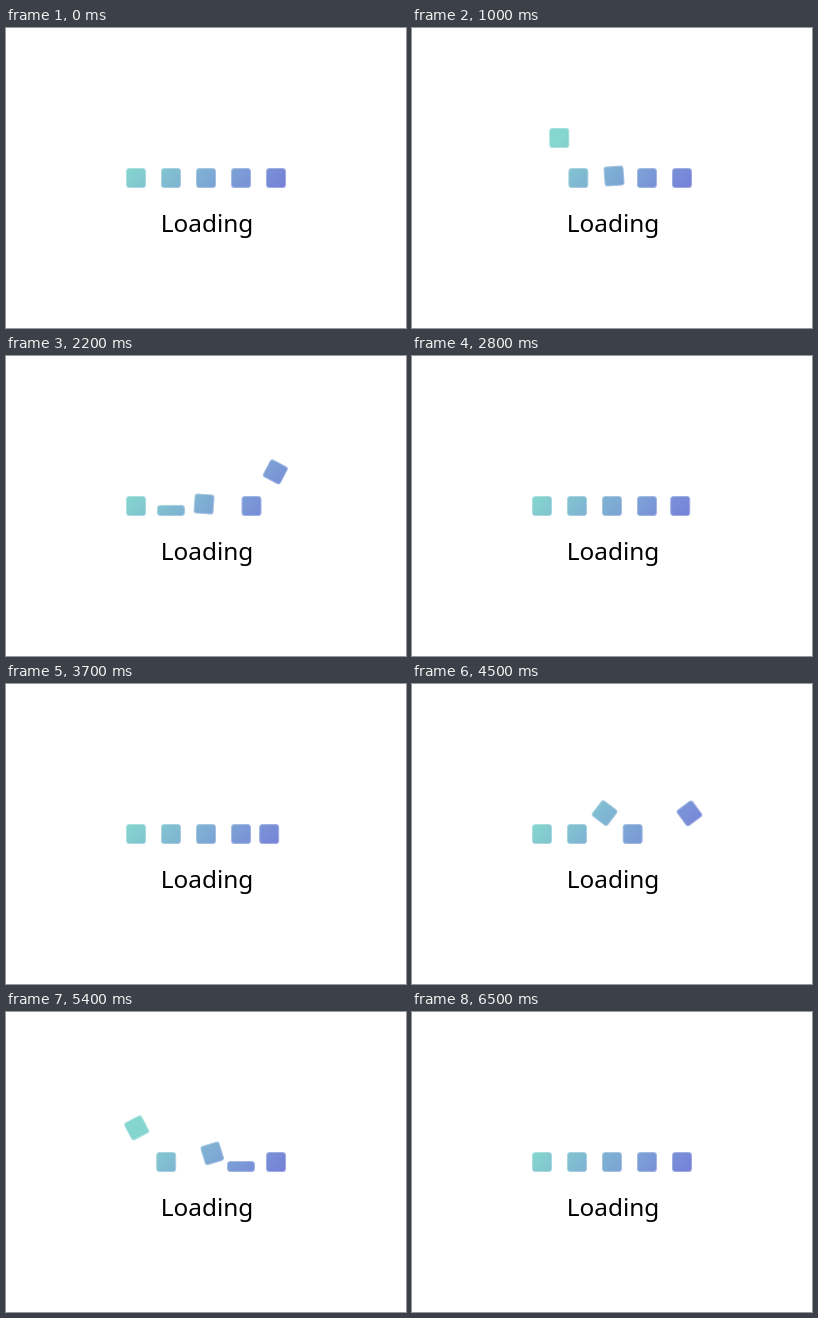
Animation of 400 by 300 pixels, one loop 6.7 s. Source, as an HTML page:

```html
<!DOCTYPE html>
<html lang="en">
<head>
<meta charset="utf-8">
<title>Loading</title>
<style>
  html, body { margin: 0; width: 100%; height: 100%; overflow: hidden; background: #fff; }
  svg { display: block; width: 100vw; height: 100vh; }
  text { font: 24.4px "Noto Sans", "Open Sans", sans-serif; text-anchor: middle; }
</style>
</head>
<body>
<svg viewBox="0 0 400 300">
  <defs>
    <linearGradient id="tint" gradientUnits="userSpaceOnUse" x1="125" y1="135" x2="215" y2="225">
      <stop offset="0" stop-color="#85d6ce"/>
      <stop offset="1" stop-color="#767fd9"/>
    </linearGradient>
    <mask id="squares" maskUnits="userSpaceOnUse" x="0" y="0" width="400" height="300"></mask>
  </defs>
  <rect width="400" height="300" fill="url(#tint)" mask="url(#squares)"/>
  <text x="201" y="204">Loading</text>
</svg>
<script>
const LOOP = 6700, SLIDE = 3000, JUMP = 1000, SQUASH = 500, BACK = 3300;
const GAP = 35, FIRST = 130, REST_Y = 150, SIZE = 20, RIM = 1;
const JUMP_OUT = [500, 900, 1300, 1800];
const JUMP_BACK = [5000, 4600, 4200, 3800];

// Hop path: an ellipse entered and left below its centre.
const RX = 25.3, HEIGHT = 40;
const DIP = Math.acos(GAP / 2 / RX);
const RY = HEIGHT / (1 + Math.sin(DIP));

const clamp = v => Math.min(1, Math.max(0, v));
const smooth = u => { u = clamp(u); return u * u * (3 - 2 * u); };
const sine = u => (1 - Math.cos(Math.PI * clamp(u))) / 2;
const bump = u => smooth(2 * u) - smooth(2 * u - 1);

const mask = document.getElementById("squares");

function setAttrs(el, attrs) {
  for (const name in attrs) el.setAttribute(name, attrs[name]);
}

const squares = Array.from({ length: 5 }, () => {
  const rect = document.createElementNS("http://www.w3.org/2000/svg", "rect");
  setAttrs(rect, { rx: 2.6, fill: "#fff", stroke: "#b4b4b4", "stroke-width": RIM });
  return mask.appendChild(rect);
});

// Squashing keeps the bottom edge in place and the corners round.
function place(rect, x, y, turn = 0, squash = 0) {
  const w = SIZE * (1 + 0.44 * squash), h = SIZE * (1 - 0.5 * squash);
  setAttrs(rect, {
    x: (RIM - w) / 2, y: SIZE / 2 - h + RIM / 2, width: w - RIM, height: h - RIM,
    transform: `translate(${x} ${y}) rotate(${turn})`
  });
}

function placeJumper(i, t) {
  const out = JUMP_OUT[i], back = JUMP_BACK[i];
  // 0 = right-hand slot, 1 = left-hand slot
  const p = sine((t - out) / JUMP) - sine((t - back) / JUMP);
  const angle = -DIP + p * (Math.PI + 2 * DIP);
  const x = FIRST + GAP * (i + 0.5) + RX * Math.cos(angle);
  const y = REST_Y - RY * (Math.sin(DIP) + Math.sin(angle));
  const squash = bump((t - out - JUMP) / SQUASH) + bump((t - back - JUMP) / SQUASH);
  // A landed square has made a half turn, which looks the same as none.
  place(squares[i + 1], x, y, p < 1 ? -180 * p : 0, squash);
}

function draw(t) {
  const slide = smooth(t / SLIDE) - smooth((t - BACK) / SLIDE);
  place(squares[0], FIRST + 4 * GAP * slide, REST_Y);
  for (let i = 0; i < 4; i++) placeJumper(i, t);
}

const start = performance.now();
function tick() {
  draw((performance.now() - start) % LOOP);
  requestAnimationFrame(tick);
}
tick();
</script>
</body>
</html>
```
